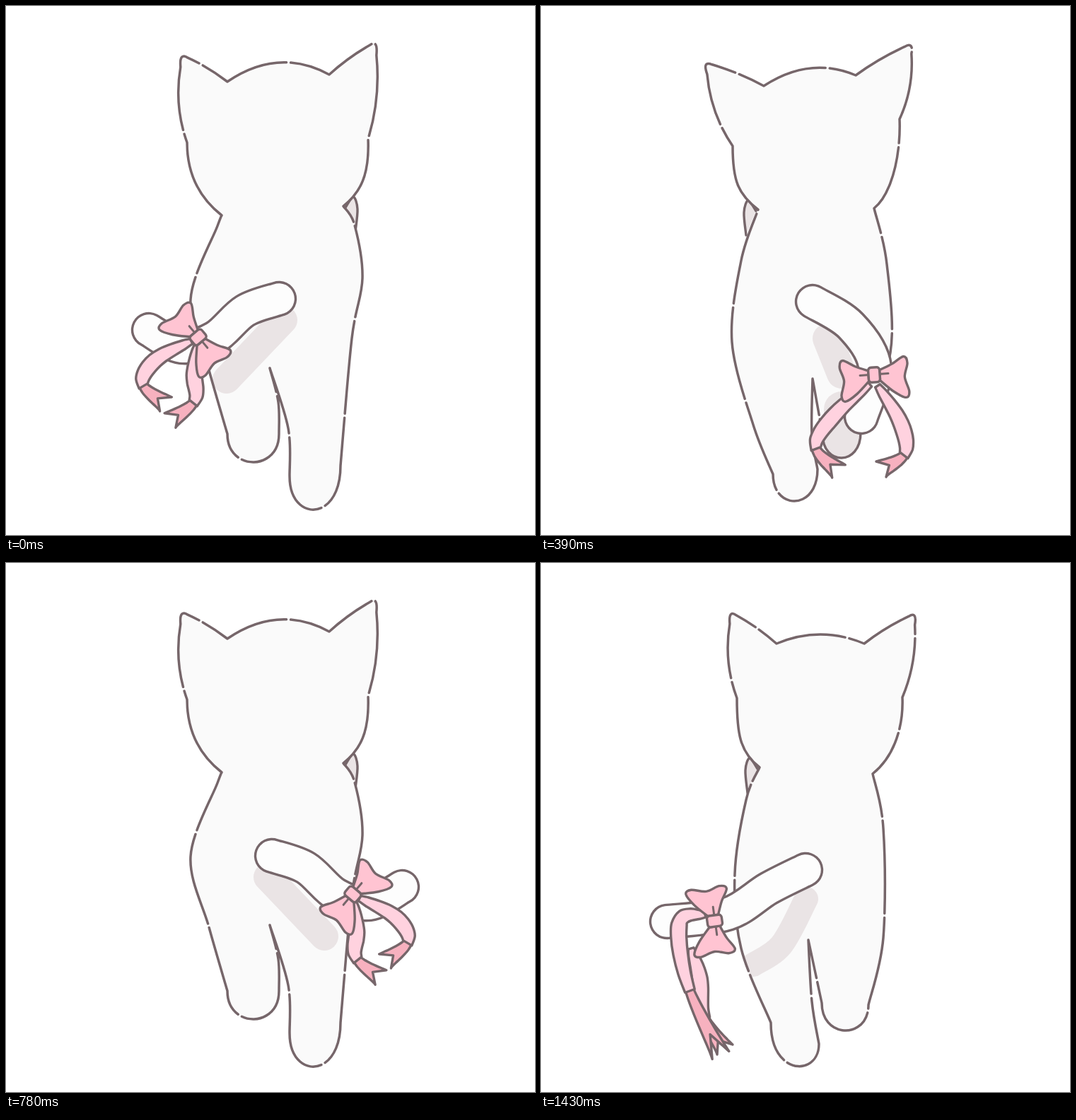
Recreate the animation shown at these times as an HTML page. Size 748 px wide and 748 px high, loop 1.56 s.

```html
<!DOCTYPE html>
<html lang="en">
<head>
<meta charset="utf-8">
<title>Walking cat</title>
<style>
html, body { margin: 0; width: 100%; height: 100%; overflow: hidden; background: #fff; }
svg { display: block; width: 100%; height: 100%; }
</style>
</head>
<body>
<svg id="stage" viewBox="0 0 748 748" fill="none" stroke-linecap="round" stroke-linejoin="round"></svg>
<script>
const STEP = 130, AXIS = 381, TAIL_WIDTH = 47;
const INK = '#76666a', FUR = '#fafafa', TAIL = '#fdfdfd', SHADE = '#eae4e5';
const PINK = '#ffc4d2', LIGHT = '#ffd2df', DARK = '#f7b1bf';

const points = text => {
  const n = text.match(/-?[\d.]+/g).map(Number);
  return n.filter((_, i) => i % 2 === 0).map((x, i) => [x, n[2 * i + 1]]);
};
const str = (...pts) => pts.map(p => p.map(v => +v.toFixed(1)).join(' ')).join(' ');
const mix = (a, b, t) => a.map((v, k) => v + (b[k] - v) * t);
const move = (p, x, y) => [p[0] + x, p[1] + y];

// Smooth curve through all points, continuing from the first.
function curve(pts) {
  let d = '';
  for (let i = 0; i + 1 < pts.length; i++) {
    const a = pts[i], b = pts[i + 1], before = pts[i - 1] || a, after = pts[i + 2] || b;
    const c1 = a.map((v, k) => v + (b[k] - before[k]) / 6);
    const c2 = b.map((v, k) => v - (after[k] - a[k]) / 6);
    d += 'C' + str(c1, c2, b);
  }
  return d;
}
const smooth = pts => 'M' + str(pts[0]) + curve(pts);

// Single arc that swells outward by h.
function bulge(a, b, h) {
  const dx = b[0] - a[0], dy = b[1] - a[1], k = 2 * h / Math.hypot(dx, dy);
  return 'Q' + str(move(mix(a, b, .5), dy * k, -dx * k), b);
}

function ear(from, tip, to, swellIn, swellOut) {
  const p = mix(tip, from, .16), q = mix(tip, to, .16);
  return bulge(from, p, swellIn) + 'Q' + str(tip, q) + bulge(q, to, swellOut);
}

// Head: neck, ear base, tip and inner corner on the left, then the same back on the right.
function headPath([neckL, baseL, tipL, innerL, innerR, tipR, baseR, neckR], dome) {
  const top = [(innerL[0] + innerR[0]) / 2, 2 * dome - (innerL[1] + innerR[1]) / 2];
  return 'M' + str(neckL) + 'C' + str(move(neckL, -28, -22), move(baseL, 0, 50), baseL)
    + ear(baseL, tipL, innerL, 7, 2) + 'Q' + str(top, innerR) + ear(innerR, tipR, baseR, 2, 6)
    + 'C' + str(move(baseR, 2, 50), move(neckR, 25, -20), neckR);
}

// Torso: "/" is a sharp corner, "U" a round foot given by its lowest y and far edge.
function torsoPath(text, start, end) {
  let last = start, d = '';
  const parts = text.split(/(?=[/U])/);
  parts.forEach((part, i) => {
    if (part[0] === 'U') {
      const [low, x, y] = part.match(/\d+/g).map(Number);
      const c = (low - (last[1] + y) / 8) / .75;
      d += 'C' + str([last[0], c], [x, c], [x, y]);
      last = [x, y];
    } else {
      const pts = [last, ...points(part)];
      if (i === parts.length - 1) pts.push(end);
      d += curve(pts);
      last = pts[pts.length - 1];
    }
  });
  return d;
}

function pawPath(neck, side) {
  const at = (x, y) => move(neck, side * x, y);
  return smooth([at(3, 2), at(14, -13), at(20, 4), at(17, 36)]);
}

const shape = (d, fill, width = 3.4) => `<path d="${d}" fill="${fill}" stroke="${INK}" stroke-width="${width}"/>`;
const line = (d, color, width) => `<path d="${d}" stroke="${color}" stroke-width="${width}"/>`;

function bow([x, y, angle, size]) {
  const loop = points('-8 -7 -26 -17 -43 -29 -48 -20 -43 0 -48 20 -43 29 -26 22 -8 8');
  const side = s => shape(smooth(loop.map(([u, v]) => [s * u, v - .15 * u])) + 'Z', PINK)
    + line(`M${-s * 10} 0h${-s * 10}`, INK, 3);
  return `<g transform="translate(${x} ${y}) rotate(${angle}) scale(${size})">${side(1)}${side(-1)}
    <rect x="-8" y="-10" width="16" height="21" rx="4" fill="${PINK}" stroke="${INK}" stroke-width="3.4"/></g>`;
}

function along(pts, t) {
  const i = Math.min(Math.floor(t * (pts.length - 1)), pts.length - 2), u = t * (pts.length - 1) - i;
  const b = pts[i], c = pts[i + 1], a = pts[i - 1] || b, e = pts[i + 2] || c;
  return b.map((v, k) => v + .5 * u * (c[k] - a[k]
    + u * (2 * a[k] - 5 * v + 4 * c[k] - e[k] + u * (3 * (v - c[k]) + e[k] - a[k]))));
}

// A band that swells, pinches where it twists, and ends in a fork.
function ribbon(text) {
  const pts = points(text), twist = .66;
  const edge = (t, w) => {
    const a = along(pts, Math.max(0, t - .01)), b = along(pts, Math.min(1, t + .01));
    const k = w / Math.hypot(b[0] - a[0], b[1] - a[1]);
    return move(along(pts, t), (b[1] - a[1]) * k, (a[0] - b[0]) * k);
  };
  const band = (from, to, width, tail) => {
    const left = [], right = [];
    for (let i = 0; i <= 8; i++) {
      const t = from + (to - from) * i / 8, w = width(i / 8);
      left.push(edge(t, w));
      right.unshift(edge(t, -w));
    }
    return smooth(left) + 'L' + str(...tail, right[0]) + curve(right) + 'Z';
  };
  const dark = band(twist, 1, s => 5 + 8 * s, [along(pts, .88)]);
  const light = band(0, twist + .04, s => 4 + 7 * Math.sin(Math.PI * s * .85), []);
  return shape(dark, DARK) + shape(light, LIGHT);
}

const poses = [];
const pose = p => poses.push(p);

pose({
  head: '305 296 256 193 245 66 313 107 457 97 526 47 512 188 477 283', dome: 80, side: 1,
  torso: '493 310 504 385 489 470 473 650 U 712 401 665 / 399 597 373 512 / 385 560 386 605 U 645 313 605 / 287 515 261 415 299 311',
  tail: '386 414 338 431 295 469 248 482 202 458',
  shade: ['392 444 312 528', 40],
  bow: [272, 468, 50, 1],
  ribbons: ['262 474 212 500 193 534 226 563', '270 480 266 520 267 558 232 586']
});
pose({
  head: '312 290 267 192 248 64 317 106 449 97 527 49 512 174 475 281', dome: 86, side: 1,
  torso: '489 322 503 405 489 520 470 655 U 716 395 675 / 390 577 353 571 / 295 505 272 430 290 350',
  tail: '378 410 350 475 385 537 448 555',
  shade: ['390 442 388 490', 22], under: ['405 588 452 588', 24],
  bow: [385, 525, -36, .95],
  ribbons: ['382 535 358 590 338 622 351 648', '420 533 444 560 420 610 431 643']
});
pose({
  head: '307 288 271 198 228 77 315 113 445 98 527 50 507 160 471 286', dome: 88, side: -1,
  torso: '489 365 494 490 452 603 U 639 398 605 / 384 527 / 383 605 391 655 U 700 328 662 / 300 592 270 475 283 360',
  tail: '384 418 438 452 472 510 453 581',
  shade: ['405 470 425 520', 42], foot: '425 570 425 635',
  bow: [471, 521, -4, 1],
  ribbons: ['465 535 418 575 388 622 421 658', '476 537 508 588 515 632 481 655']
});
pose({
  head: '309 289 277 191 265 66 333 114 457 114 532 68 511 190 469 298', dome: 98, side: -1,
  torso: '484 375 484 530 463 625 U 661 397 622 / 378 533 / 383 620 393 680 U 711 325 650 / 283 545 274 440 290 335',
  tail: '383 425 440 452 505 474 565 442',
  shade: ['400 468 462 552', 36],
  bow: [536, 458, 61, 1],
  ribbons: ['555 495 582 500 596 522 602 536', '538 500 563 520 569 548 537 565']
});
pose({
  head: '309 291 275 194 265 72 325 120 465 123 525 71 503 196 466 300', dome: 106, side: 1,
  torso: '486 370 486 530 463 615 458 655 U 705 397 665 / 381 541 / 386 615 U 630 316 590 / 277 490 280 380',
  tail: '381 420 345 468 322 540 349 592',
  shade: ['386 455 368 540', 30], foot: '360 565 360 615',
  bow: [326, 539, -15, .9],
  ribbons: ['324 550 302 600 303 642 333 680', '332 550 355 590 349 636 373 669']
});
pose({
  head: '308 298 279 184 274 72 323 119 464 119 518 60 506 184 468 301', dome: 97, side: -1,
  torso: '488 365 493 445 465 540 U 586 398 555 / 386 530 / 386 610 392 685 U 708 330 645 / 280 500 274 410 288 335',
  tail: '372 433 300 470 252 510 244 576',
  shade: ['375 470 345 520 312 575', 28],
  bow: [247, 516, 21, 1],
  ribbons: ['240 528 205 575 192 625 222 667', '246 528 268 582 282 622 270 668']
});
pose({
  ...poses[3],
  dome: 101,
  tail: '374 434 322 460 264 496 178 507',
  shade: ['375 475 340 540 300 568', 34],
  bow: [246, 506, 82, 1],
  ribbons: ['212 545 224 585 230 640 260 688', '232 497 196 508 207 595 254 696']
});

// The walk repeats after half a loop while the tail swings to the other side.
const order = [0, 1, 4, 2, 5, 3, 0, 1, 4, 2, 5, 6];
const mirrored = [2, 4, 6, 7, 9];

function frame(index, i) {
  const p = poses[index], head = points(p.head), neckL = head[0], neckR = head[7];
  const flip = mirrored.includes(i) ? ` transform="translate(${2 * AXIS} 0) scale(-1 1)"` : '';
  const body = headPath(head, p.dome) + torsoPath(p.torso, neckR, neckL);
  const shadow = ([text, width]) => line(smooth(points(text)), SHADE, width);
  const tail = smooth(points(p.tail));
  return `<g display="none">
    <clipPath id="fur${i}"><path d="${body}"/></clipPath>
    ${shape(pawPath(p.side > 0 ? neckR : neckL, p.side), SHADE)}
    <path d="${body}" fill="${FUR}"/>
    <g clip-path="url(#fur${i})">${p.foot ? shadow([p.foot, 50]) : ''}
      <g${flip}>${shadow(p.shade)}${p.under ? shadow(p.under) : ''}</g></g>
    <path d="${body}" stroke="${INK}" stroke-width="3.5" stroke-dasharray="131 6"/>
    <g${flip}>${line(tail, INK, TAIL_WIDTH + 3.4)}${line(tail, TAIL, TAIL_WIDTH - 3.4)}
      ${p.ribbons.map(ribbon).join('')}${bow(p.bow)}</g></g>`;
}

const stage = document.getElementById('stage');
stage.innerHTML = order.map(frame).join('');
const frames = [...stage.children];
let shown = -1;

function draw(time) {
  const now = Math.floor(time / STEP) % frames.length;
  if (now === shown) return;
  if (shown >= 0) frames[shown].setAttribute('display', 'none');
  frames[now].setAttribute('display', 'inline');
  shown = now;
}

const begin = performance.now();
function tick() {
  draw(performance.now() - begin);
  requestAnimationFrame(tick);
}
tick();
</script>
</body>
</html>
```
